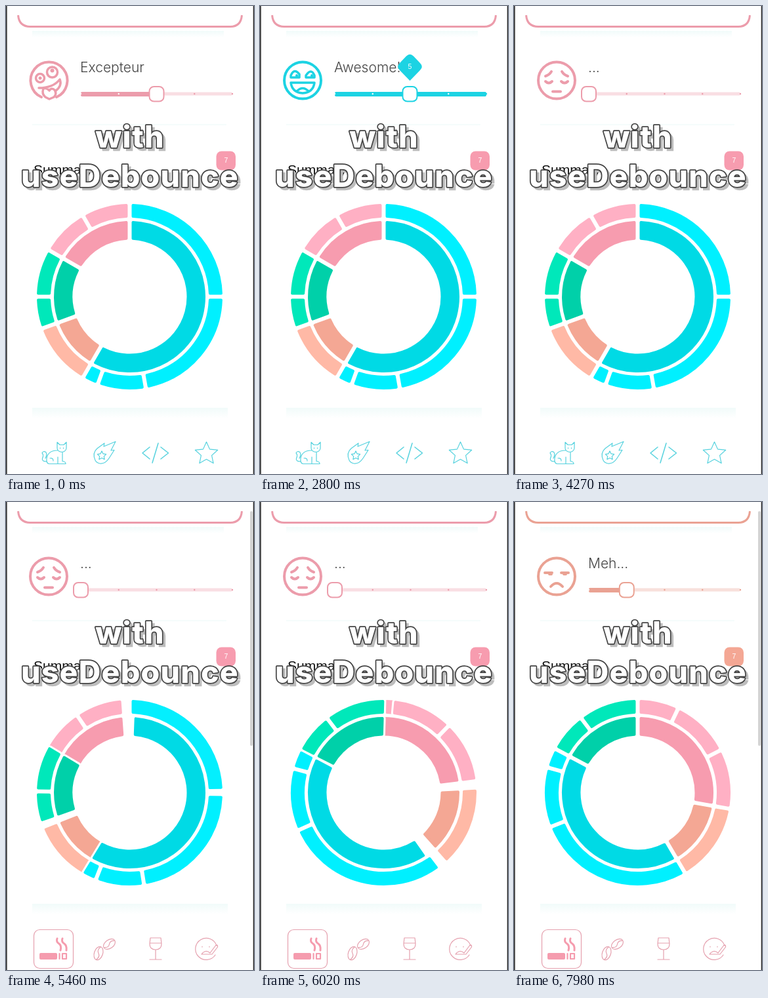
Write an HTML page that moves like this. It is 378 px wide and 714 px high and loops after 8 s.

```html
<!DOCTYPE html>
<html lang="en">
<head>
<meta charset="utf-8">
<title>Debounced slider</title>
<style>
  html, body { margin: 0; width: 100%; height: 100%; overflow: hidden; background: #fff; }
  svg { display: block; width: 378px; height: 714px; }
  text { font-family: "Liberation Sans", Arial, sans-serif; }
  .caption { font: 800 46.5px Inter, "Open Sans", sans-serif; letter-spacing: 1.2px; text-anchor: middle; }
  .front { fill: #fff; stroke: #444; stroke-width: 3.4px; paint-order: stroke; stroke-linejoin: round; }
  .back { fill: #bdbdbd; stroke: #bdbdbd; stroke-width: 2.5px; }
  .line { fill: none; stroke: currentColor; stroke-linecap: round; stroke-linejoin: round; }
  .solid { fill: currentColor; stroke: none; }
  .small { fill: #fff; text-anchor: middle; font-size: 10.5px; }
  #label { font: 300 21px Inter, Roboto, sans-serif; fill: #444; }
</style>
</head>
<body>
<svg viewBox="0 0 378 714">
  <defs>
    <linearGradient id="haze" x2="0" y2="1">
      <stop stop-color="#f1fbfa"/><stop offset="1" stop-color="#fff"/>
    </linearGradient>
  </defs>
  <rect width="378" height="714" fill="#fff"/>
  <rect x="40" y="38" width="292" height="10" fill="url(#haze)"/>
  <rect x="40" y="180" width="296" height="3" fill="url(#haze)"/>
  <rect x="40" y="613" width="298" height="16" fill="url(#haze)"/>
  <path id="card" class="line" stroke-width="3" style="stroke-linecap:butt"
        d="M18.5 14Q20 31.5 37 31.5H342Q358 31.5 359.5 14"/>

  <g id="slider">
    <g id="face" class="line" stroke-width="4"></g>
    <text id="label" x="113" y="101"></text>
    <rect class="solid" x="114" y="131.5" width="231" height="5" rx="2" opacity=".33"/>
    <rect id="track" class="solid" x="114" y="131" height="7" rx="2"/>
    <g id="marks"></g>
    <g id="thumb">
      <rect x="-11" y="123" width="22" height="22.5" rx="7" fill="#fff" stroke="currentColor" stroke-width="2"/>
      <g id="bubble">
        <path class="solid" d="M0 114L-15.5 98Q-21 92.5-15.5 87L-5.5 76.5Q0 71 5.5 76.5L15.5 87Q21 92.5 15.5 98Z"/>
        <text id="value" class="small" y="96" font-size="11"></text>
      </g>
    </g>
  </g>

  <text x="42" y="257" font-size="21" fill="#111">Summary</text>
  <g id="badge">
    <rect class="solid" x="320.5" y="221.5" width="29.5" height="29" rx="8"/>
    <text class="small" x="335.5" y="239">7</text>
  </g>
  <g id="donut"></g>

  <g id="goodIcons" class="line" color="#56d2de" stroke-width="1.2">
    <path d="M78 675V665.5L82 669.5H88L92 665.5V675Q91 680 85 680.5Q79 680 78 675
             M78.5 678Q64 678 62 690Q61 698 66 698.5H91Q91 695 86 694.5V681
             M79 698V688M72 694Q72 689 67 690M62 695Q54 695 55.500 690Q58 685 55 682Q57 678 61 681Q63 685 60 690M82.500 674v1M87.500 674v1"/>
    <path d="M136 693Q131 682 139 675L150 667L149 672L167 664.5L160 678L165 677.5L157 690Q151 699 143 698Q138 697 136 693Z"/>
    <path id="cometStar"/>
    <path stroke-width="1.5" d="M219 673L208 682L219 691M236 673L247.5 682L236 691M232 667L223 697"/>
    <path id="star"/>
  </g>
  <g id="badIcons" class="line" color="#e5a0ae" stroke-width="1.2">
    <rect x="42.5" y="652.5" width="60" height="59" rx="9"/>
    <rect class="solid" x="51" y="688" width="27" height="10" rx="2" color="#f59cae"/>
    <g stroke="#f59cae" stroke-width="2.2">
      <path d="M81.5 689v8M86 689h6v8h-6z"/>
      <path stroke-width="3" d="M78 666Q76 671 81 674Q85 677 83 684M86 666Q84 671 89 674Q93 677 92 684"/>
    </g>
    <g transform="translate(141 688.5) rotate(18)"><ellipse rx="6.5" ry="10.5"/><path d="M0-10Q-4-4 0 0T0 10"/></g>
    <g transform="translate(157.5 674.5) rotate(55)"><ellipse rx="6.5" ry="10"/><path d="M0-9Q-4-4 0 0T0 9"/></g>
    <path d="M220 665H236L237 674Q237 683 228 683Q219 683 219 674ZM219 673H237M228 683V698M219 698H237"/>
    <path d="M321 677A16.5 16.5 0 1 0 319 691M299 678v1M310 678v1M298 690Q304 682 311 688L320 676Q323 675 322.5 679L314 690Z"/>
  </g>

  <g id="captions"></g>
  <rect id="scrollbar" x="372" y="14" width="4" height="358" rx="2" fill="#d4d4d4"/>
  <path d="M.8 0V714M377.5 0V714" stroke="#222" stroke-width="1.5"/>
</svg>
<script>
const $ = id => document.getElementById(id);
const LOOP = 8000, TAU = Math.PI * 2;
const PINK = "#ec9cab", SALMON = "#eaa293", CYAN = "#1cd3e3";
const FIRST_UPDATE = 5443, SECOND_UPDATE = 7540;

// --- Slider ---
const outline = '<circle cx="65" cy="113.5" r="28"/>';
const moods = {
  1: { label: "...", color: PINK, face: outline +
    '<path d="M48 107Q54 105 57 100M82 107Q76 105 73 100M48 115Q53 120 58 115M72 115Q77 120 82 115M59 130.5H71"/>' },
  2: { label: "Meh...", color: SALMON, face: outline +
    '<path d="M47 108H58M72 108H83M54 110h3M76 110h3M56 129Q65 119 74 129"/>' },
  3: { label: "Excepteur", color: PINK, face:
    '<path d="M54 139A28 28 0 1 1 77 139"/><circle cx="52" cy="110" r="6.5" stroke-width="3.5"/>' +
    '<circle cx="70.5" cy="101" r="8" stroke-width="3.5"/>' +
    '<g class="solid"><circle cx="52" cy="110" r="2.5"/><circle cx="70.5" cy="98.5" r="3"/></g>' +
    '<path stroke-width="3.5" d="M50 125Q72 125 82 112Q86 122 75 130M57 126Q54 134 60 139L66 142L73 139Q78 134 74 128Q69 124 66 129Q62 124 57 126"/>' },
  5: { label: "Awesome!", color: CYAN, face: outline +
    '<path stroke-width="3.5" d="M47 109V106Q52 94 60 104V109ZM70 109V106Q78 94 83 106V109ZM47 117H83Q81 132 65 133Q49 132 47 117ZM56 130Q65 121 74 130"/>' +
    '<path d="M56 106v1M79 106v1"/>' }
};
const moves = [[0, 3], [2150, 1], [2749, 5], [3377, 1], [6050, 2]];
const stopX = value => 114 + (value - 1) * 57.75;

$("marks").innerHTML = [1, 2, 3, 4, 5].map(v => `<circle cx="${stopX(v)}" cy="134" r="1.2"/>`).join("");

const clamp = x => Math.max(0, Math.min(1, x));
const glide = x => { const s = clamp(x) ** .66; return s * s * (3 - 2 * s); };

let shownMood;
function drawSlider(t) {
  const i = moves.findLastIndex(m => m[0] <= t);
  const [start, value] = moves[i];
  const previous = i ? moves[i - 1][1] : value;
  const x = stopX(previous) + (stopX(value) - stopX(previous)) * glide((t - start) / 150);
  const mood = moods[value];
  if (shownMood !== mood) {
    shownMood = mood;
    $("slider").setAttribute("color", mood.color);
    $("face").innerHTML = mood.face;
    $("label").textContent = mood.label;
    $("value").textContent = value;
    $("track").setAttribute("width", stopX(value) - 114);
    [...$("marks").children].forEach((dot, n) =>
      dot.setAttribute("fill", n + 1 < value ? "#fff" : mood.color));
  }
  $("thumb").setAttribute("transform", `translate(${x} 0)`);
  const pop = (from, to) => glide((t - from) / 150) - glide((t - to) / 150);
  const size = pop(2050, 3650) + pop(6040, 6500);
  $("bubble").setAttribute("transform", `translate(0 ${114 * (1 - size)}) scale(${size})`);
}

// --- Donut ---
const palette = {  // outer, inner
  cyan: [[0, 240, 255], [0, 218, 229]],
  salmon: [[255, 185, 166], [244, 167, 148]],
  green: [[0, 232, 186], [0, 208, 169]],
  pink: [[255, 176, 196], [247, 156, 175]]
};
const after = level => [
  ["pink", { habit: level, p1: 3, p2: 3 }], ["salmon", { s1: 4 }],
  ["cyan", { c1: 8, c2: 3, c3: 1 }], ["green", { g1: 2, g2: 3 }]
];
const before = [
  ["cyan", { habit: 9, c1: 8, c2: 3, c3: 1 }], ["salmon", { s1: 4 }],
  ["green", { g1: 2, g2: 3 }], ["pink", { p1: 3, p2: 3 }]
];

// Each arc is [start, end, red, green, blue], so it can be blended as a whole.
function layout(groups) {
  const total = groups.flatMap(g => Object.values(g[1])).reduce((a, b) => a + b);
  const arcs = {};
  let sum = 0;
  for (const [name, items] of groups) {
    const first = sum;
    for (const id in items)
      arcs[id] = [sum / total * TAU, (sum += items[id]) / total * TAU, ...palette[name][0]];
    arcs[name] = [first / total * TAU, sum / total * TAU, ...palette[name][1]];
  }
  return arcs;
}
const states = [layout(before), layout(after(1)), layout(after(2))];

function spring(ms) {
  const s = Math.max(0, ms) / 1000, damping = 6.4, w = 7.7;
  return 1 - Math.exp(-damping * s) * (Math.cos(w * s) + damping / w * Math.sin(w * s));
}

function arcPath(start, end, inner, outer) {
  const side = 5;  // half the gap plus the rounded edge
  const r0 = inner + 2, r1 = outer - 2;
  const span = r => {
    const middle = (start + end) / 2, half = Math.max(.002, (end - start) / 2 - side / r);
    return [middle - half, middle + half];
  };
  const point = (r, a) => `${(188.5 + r * Math.sin(a)).toFixed(2)} ${(443.5 - r * Math.cos(a)).toFixed(2)}`;
  const [a, b] = span(r1), [c, d] = span(r0), large = +(b - a > Math.PI);
  return `M${point(r1, a)}A${r1} ${r1} 0 ${large} 1 ${point(r1, b)}` +
         `L${point(r0, d)}A${r0} ${r0} 0 ${large} 0 ${point(r0, c)}Z`;
}

function drawDonut(t) {
  const p1 = spring(t - FIRST_UPDATE), p2 = spring(t - SECOND_UPDATE);
  const [A, B, C] = states;
  $("donut").innerHTML = Object.keys(C).map(id => {
    const [start, end, ...rgb] = A[id].map((a, i) => a + (B[id][i] - a) * p1 + (C[id][i] - B[id][i]) * p2);
    const color = `rgb(${rgb.map(v => Math.round(Math.max(0, Math.min(255, v))))})`;
    const d = id in palette ? arcPath(start, end, 87, 115.5) : arcPath(start, end, 120.5, 141.5);
    return `<g stroke-linejoin="round"><path d="${d}" stroke="#fff" stroke-width="10"/>` +
           `<path d="${d}" fill="${color}" stroke="${color}" stroke-width="4"/></g>`;
  }).join("");
}

// --- Fixed parts ---
const starPath = (x, y, outer, inner) => "M" + Array.from({ length: 10 }, (_, i) => {
  const r = i % 2 ? inner : outer, a = i * TAU / 10;
  return `${x + r * Math.sin(a)} ${y - r * Math.cos(a)}`;
}).join("L") + "Z";
$("cometStar").setAttribute("d", starPath(146, 686, 7, 3.5));
$("star").setAttribute("d", starPath(305.5, 683, 18, 8.5));

$("captions").innerHTML = [["with", 216], ["useDebounce", 276]].map(([word, y]) =>
  `<text class="caption back" x="193" y="${y + 4}">${word}</text>` +
  `<text class="caption front" x="189" y="${y}">${word}</text>`).join("");

function draw(t) {
  drawSlider(t);
  drawDonut(t);
  const updated = t >= FIRST_UPDATE - 45, salmon = t >= SECOND_UPDATE;
  $("goodIcons").style.display = updated ? "none" : "";
  $("badIcons").style.display = updated ? "" : "none";
  $("card").setAttribute("color", salmon ? SALMON : PINK);
  $("badge").setAttribute("color", salmon ? "#f4a794" : "#f79caf");
  const visible = from => t < from ? 0 : clamp((from + 480 - t) / 40);
  $("scrollbar").setAttribute("opacity", visible(FIRST_UPDATE - 45) + visible(SECOND_UPDATE));
}

function tick() {
  draw(performance.now() % LOOP);
  requestAnimationFrame(tick);
}
tick();
</script>
</body>
</html>
```
